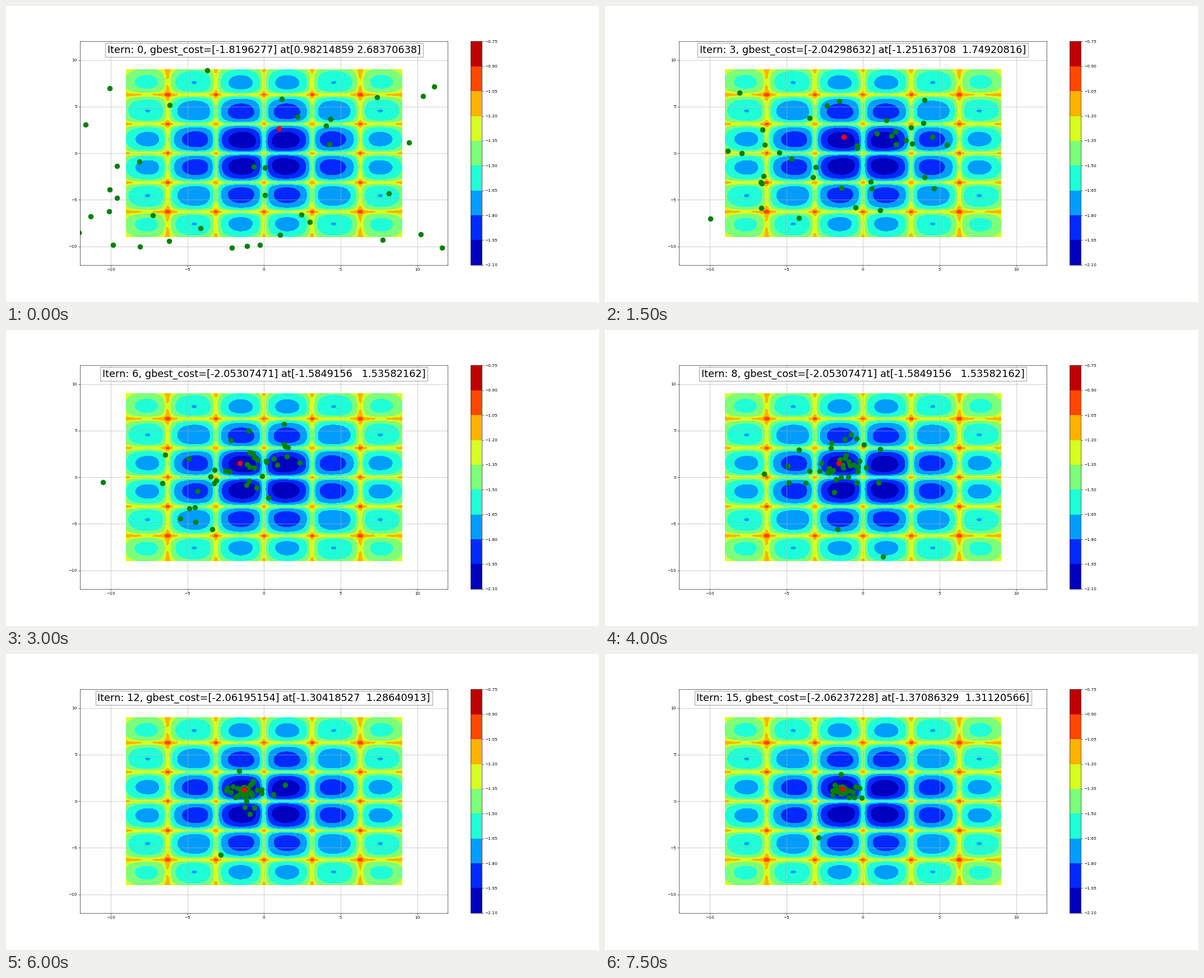
A matplotlib script for the animation above (8000 ms loop, 1058 by 529 pixels).

```python
import numpy as np
import matplotlib.pyplot as plt
from matplotlib.animation import FuncAnimation

STEPS, STEP_MS, SWARM = 16, 500, 39
SHRINK, PULL = 0.8, 0.7

# Iteration at which each new best position is found.
BEST = {
    0: (0.98214859, 2.68370638),
    2: (-1.07120415, 1.89894062),
    3: (-1.25163708, 1.74920816),
    5: (-1.5849156, 1.53582162),
    9: (-1.4821391, 1.4021883),
    10: (-1.39535289, 1.27333392),
    12: (-1.30418527, 1.28640913),
    13: (-1.29367664, 1.32936198),
    15: (-1.37086329, 1.31120566),
}

# Waypoints of the one particle that keeps wandering.
ROAM_STEP = [0, 2, 5, 8, 10, 13, 15]
ROAM_X = [-12.1, -12.1, -5.7, 1.3, -0.4, -4.05, -2.9]
ROAM_Y = [-8.5, -8.5, -4.1, -8.5, -2.2, -7.5, -3.9]


def cross_in_tray(x, y):
    wave = np.sin(x) * np.sin(y) * np.exp(np.abs(100 - np.hypot(x, y) / np.pi))
    return -0.0001 * (np.abs(wave) + 1) ** 0.1


def best_at(step):
    return np.array(BEST[max(k for k in BEST if k <= step)])


def fly():
    """Positions per iteration: offsets turn and shrink towards the best."""
    rng = np.random.default_rng(11)
    offset = rng.uniform(-13.5, 13, SWARM) + 1j * rng.uniform(-10.5, 9, SWARM)
    path = []
    for step in range(STEPS):
        x, y = best_at(step) * (1 - PULL ** step)
        swarm = np.column_stack([x + offset.real, y + offset.imag])
        roamer = [np.interp(step, ROAM_STEP, ROAM_X),
                  np.interp(step, ROAM_STEP, ROAM_Y)]
        path.append(np.vstack([swarm, roamer]))
        stretch, turn = rng.normal(0, [[0.2], [0.5]], (2, SWARM))
        offset = offset * SHRINK * np.exp(stretch + 1j * turn)
    return path


PATH = fly()

fig = plt.figure(figsize=(20, 10), dpi=52.9, facecolor="white")
ax = fig.add_axes([0.125, 0.125, 0.62, 0.755])
cax = fig.add_axes([0.78375, 0.125, 0.755 / 40, 0.755])

side = np.linspace(-9, 9, 150)
X, Y = np.meshgrid(side, side)
levels = np.linspace(-2.1, -0.75, 10)
field = ax.contourf(X, Y, cross_in_tray(X, Y), levels=levels, cmap="jet")
bar = fig.colorbar(field, cax=cax, ticks=levels)
bar.minorticks_off()

ax.set(xlim=(-12, 12), ylim=(-12, 12),
       xticks=range(-10, 11, 5), yticks=range(-10, 11, 5))
ax.grid(True)

dots, = ax.plot([], [], "o", color="green", ms=12)
best, = ax.plot([], [], "o", color="red", ms=12)
title = ax.text(0.5, 0.95, "", size=24.1, ha="center", transform=ax.transAxes,
                bbox=dict(facecolor="w", alpha=0.5, pad=5))


def update(step):
    place = best_at(step)
    cost = np.array([cross_in_tray(*place)])
    dots.set_data(*PATH[step].T)
    best.set_data(*place[:, None])
    title.set_text(f"Itern: {step}, gbest_cost={cost} at{place}")
    return dots, best, title


anim = FuncAnimation(fig, update, frames=STEPS, interval=STEP_MS, repeat=True)
plt.show()
```
